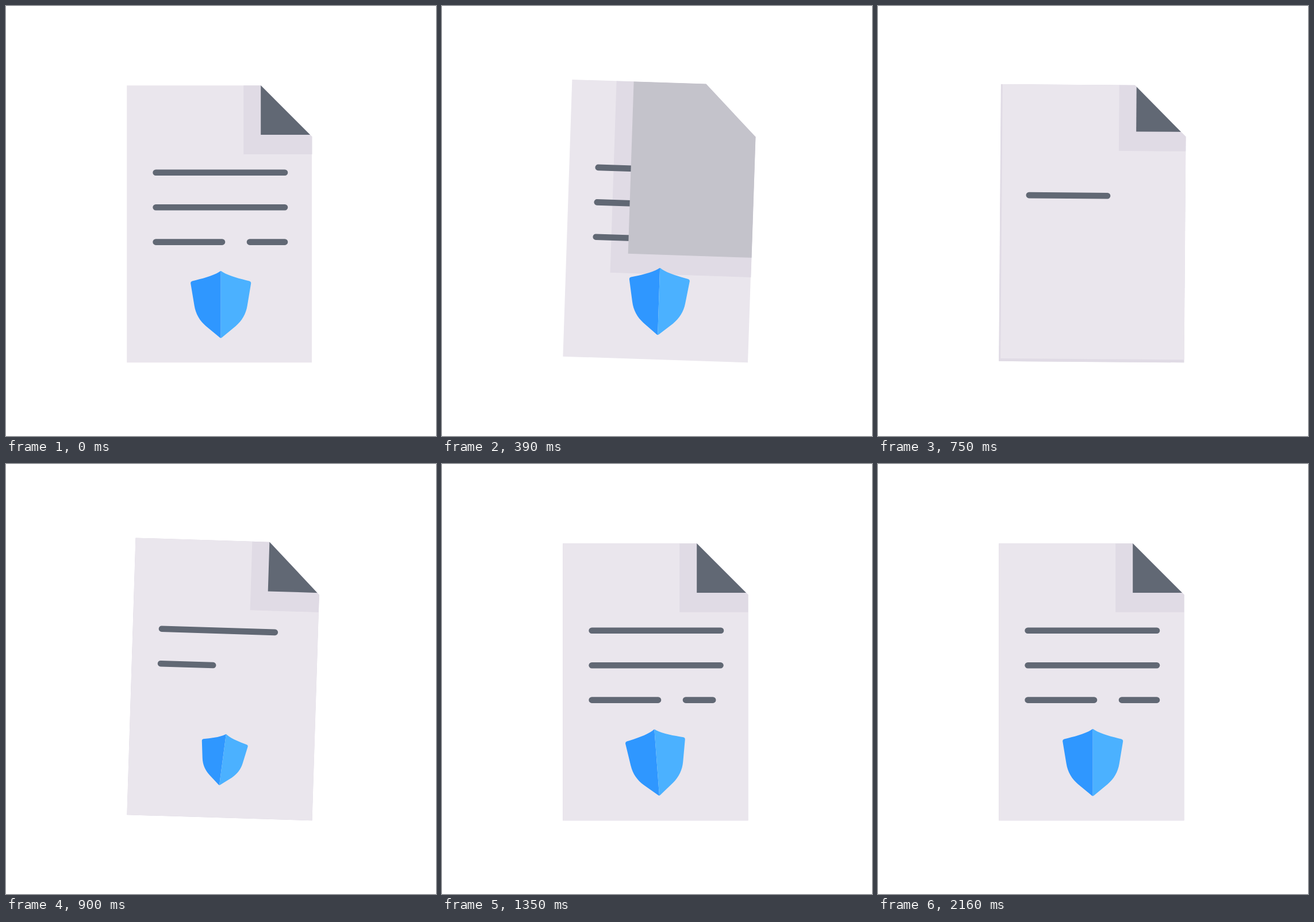
Recreate the animation shown at these times as an HTML page. Size 748 by 748 pixels, loop 2900 ms.

```html
<!DOCTYPE html>
<html lang="en">
<head>
<meta charset="utf-8">
<title>Protected document</title>
<style>
  html, body { margin: 0; width: 100%; height: 100%; overflow: hidden; background: #fff; }
  svg { display: block; width: 100%; height: 100%; }
  .paper { fill: #eae6ed; }
  .shade { fill: #e0dbe5; }
  .dark { fill: #616874; }
  .line { fill: none; stroke: #616874; stroke-width: 10.6; stroke-linecap: round; }
</style>
</head>
<body>
<svg viewBox="0 0 748 748">
  <defs>
    <clipPath id="outline"><path d="M210.2 138.3H443.3L532.5 227.5V620.3H210.2Z"/></clipPath>
    <path id="half" d="M373.7 461C372.5 461 372 461.8 371 462.5C359 470 340 474.5 324 478.4Q320.8 479.4 321.2 482.5L327.6 521C330 536 337 547.5 348 557L371 575.9Q372.6 577.4 373.7 577.4Z"/>
    <g id="shield">
      <use href="#half" fill="#2f97ff"/>
      <use href="#half" fill="#4bb1ff" transform="matrix(-1 0 0 1 747.4 0)"/>
    </g>
  </defs>
  <g id="page">
    <path class="paper" d="M210.2 138.3H443.3L532 227V620.3H210.2Z"/>
    <g clip-path="url(#outline)">
      <rect id="sheetShade" class="shade" x="180.2" y="38" width="422" height="616.3"/>
      <g id="oldContent">
        <path class="line" d="M260.6 289.7H485M260.6 350.2H485M260.6 410.6H376M424 410.6H485"/>
        <use href="#shield"/>
      </g>
      <g id="sheet">
        <rect id="sheetFace" x="210.2" y="38" width="422" height="582.3"/>
        <g id="nextFold">
          <rect class="shade" x="413.2" y="-100" width="322" height="357.8"/>
          <rect class="dark" x="443.2" y="-100" width="322" height="324"/>
        </g>
      </g>
    </g>
    <g id="newLines"></g>
    <use id="newShield" href="#shield"/>
  </g>
</svg>
<script>
const LOOP = 2900, STEP = 30;
const $ = id => document.getElementById(id);
const clamp = v => Math.min(1, Math.max(0, v));
const mix = (a, b, k) => a + (b - a) * k;

// cubic-bezier(.2, 0, 0, 1), solved by bisection
function ease(x) {
  if (x <= 0) return 0;
  if (x >= 1) return 1;
  let lo = 0, hi = 1;
  for (let i = 0; i < 24; i++) {
    const s = (lo + hi) / 2;
    if (0.6 * s * (1 - s) ** 2 + s ** 3 < x) lo = s; else hi = s;
  }
  return lo * lo * (3 - 2 * lo);
}
const tween = (t, start, length) => ease((t - start) / length);

// Swings between [time, angle] extremes with sine easing
function swing(t, keys) {
  if (t <= keys[0][0]) return keys[0][1];
  for (let i = 1; i < keys.length; i++) {
    const [t0, a] = keys[i - 1], [t1, b] = keys[i];
    if (t < t1) return mix(a, b, (1 - Math.cos(Math.PI * (t - t0) / (t1 - t0))) / 2);
  }
  return keys[keys.length - 1][1];
}

const PAGE_SWING = [[0, 0], [240, 6.8], [540, -3], [870, 1.85], [1150, 0]];
const SHIELD_SWING = [[770, 0], [1050, 13], [1290, -6], [1500, 3], [1710, -1.5], [2130, 0]];
const ROWS = [
  { y: 289.7, start: 600, parts: [[260.6, 485]] },
  { y: 350.2, start: 800, parts: [[260.6, 485]] },
  { y: 410.6, start: 1000, parts: [[260.6, 376], [424, 485]] }
];

for (const row of ROWS) {
  row.path = document.createElementNS("http://www.w3.org/2000/svg", "path");
  row.path.setAttribute("class", "line");
  $("newLines").append(row.path);
}

// Draws the first share k of the row's total length
function rowPath({ y, parts }, k) {
  let left = k * parts.reduce((sum, [a, b]) => sum + b - a, 0), d = "";
  for (const [a, b] of parts) {
    if (left <= 0) break;
    d += `M${a} ${y}H${Math.min(b, a + left)}`;
    left -= b - a;
  }
  return d;
}

const DARK = [97, 104, 116], PAPER = [234, 230, 237];
const move = (id, value) => $(id).setAttribute("transform", value);

function draw(t) {
  move("page", `rotate(${swing(t, PAGE_SWING)} 532 620.4)`);

  const slide = tween(t, 260, 600), dx = 233 * (1 - slide), dy = -396.3 * (1 - slide);
  move("sheet", `translate(${dx} ${dy})`);
  move("sheetShade", `translate(${dx} ${dy})`);
  const light = clamp(slide / 0.75);
  $("sheetFace").setAttribute("fill",
    `rgb(${DARK.map((c, i) => Math.round(mix(c, PAPER[i], light)))})`);
  $("oldContent").style.display = slide < 1 ? "" : "none";

  move("newLines", `translate(0 ${60.5 * (1 - tween(t, 700, 357))})`);
  for (const row of ROWS) row.path.setAttribute("d", rowPath(row, tween(t, row.start, 600)));

  const size = tween(t, 770, 350) * mix(0.99, 1, clamp((t - 1710) / 420));
  $("newShield").style.display = size > 0 ? "" : "none";
  move("newShield", `translate(373.7 519.3) rotate(${swing(t, SHIELD_SWING)}) scale(${size}) translate(-373.7 -519.3)`);
}

const begin = performance.now();
function tick() {
  const t = (performance.now() - begin) % LOOP;
  draw(Math.floor(t / STEP) * STEP);
  requestAnimationFrame(tick);
}
tick();
</script>
</body>
</html>
```
